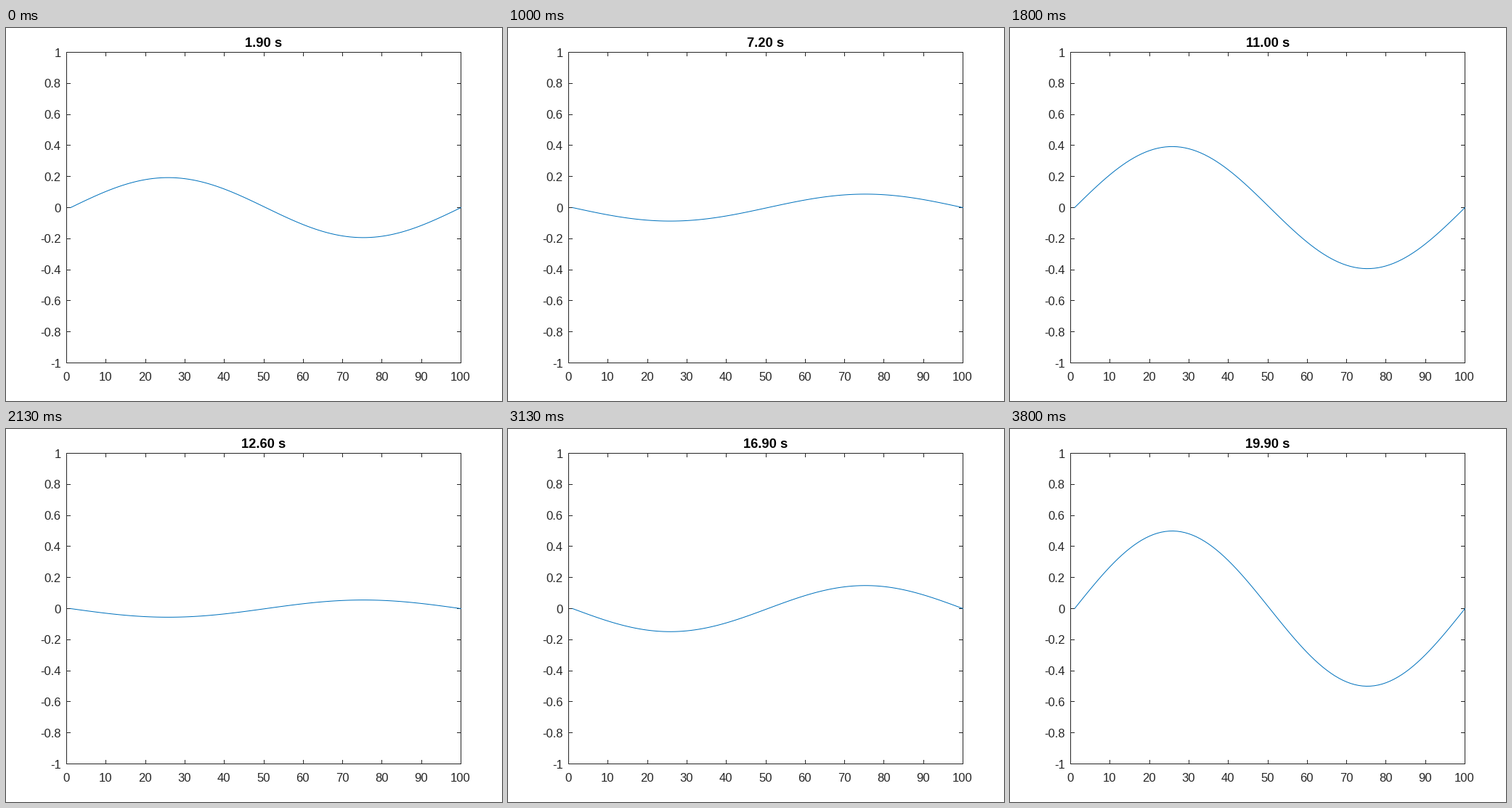
A matplotlib script for the animation above (3.87 s loop, 683 by 514 pixels).

```python
import numpy as np
import matplotlib.pyplot as plt
from matplotlib.animation import FuncAnimation
from matplotlib.collections import LineCollection

W, H, DPI = 683, 514, 64
LEFT, RIGHT, TOP, BOTTOM = 83.5, 626.5, 33.5, 461.5
TICK = 5
PT = 72 / DPI          # points per pixel
INK = "#262626"
STEP_MS, TICKS, SHOTS = 10, 387, 58

plt.rcParams["font.family"] = "Liberation Sans"
plt.rcParams["path.simplify"] = False
fig = plt.figure(figsize=(W / DPI, H / DPI), dpi=DPI, facecolor="white")
ax = fig.add_axes([0, 0, 1, 1])
ax.set(xlim=(0, W), ylim=(H, 0))
ax.axis("off")


def px(x):
    return LEFT + (RIGHT - LEFT) * x / 100


def py(y):
    return BOTTOM - (BOTTOM - TOP) * (y + 1) / 2


def label(x, y, text, ha, size=50 / 3, **kw):
    return ax.text(x, y, text, ha=ha, va="baseline", fontsize=size * PT, **kw)


# Frame, inward ticks and their labels; lines run through pixel centres
segs = [[(LEFT, TOP), (RIGHT, TOP), (RIGHT, BOTTOM), (LEFT, BOTTOM), (LEFT, TOP)]]
for v in range(0, 101, 10):
    x = np.floor(px(v)) + 0.5
    segs += [[(x, BOTTOM), (x, BOTTOM - TICK)], [(x, TOP), (x, TOP + TICK)]]
    label(px(v) - 0.5, 486, str(v), "center", color=INK)
for i in range(-5, 6):
    y = np.floor(py(i / 5)) + 0.5
    segs += [[(LEFT, y), (LEFT + TICK, y)], [(RIGHT, y), (RIGHT - TICK, y)]]
    label(75.5, py(i / 5) + 6.2, f"{i / 5:g}", "right", color=INK)
frame = LineCollection(segs, colors=INK, linewidths=PT, capstyle="projecting")
frame.set_snap(False)
ax.add_collection(frame)

# Standing wave on a string of 100 points
points = np.arange(1, 101)
mode = np.sin(2 * np.pi * (points - 1) / 99)
wave, = ax.plot(px(points), py(0 * mode), color="#0072BD", lw=PT, zorder=3, snap=False)
title = label(355, 26, "", "center", 55 / 3, weight="bold", color="black")

# Simulated seconds at a few picture numbers; the clock ran unevenly
MARKS = [0, 8, 9, 10, 21, 23, 24, 32, 39, 40, 47, 56, 57]
CLOCK = [1.9, 4.5, 4.8, 5.2, 9.5, 9.8, 10.1, 12.6, 14.9, 15.2, 16.9, 19.6, 19.9]


def update(n):
    shot = min((3 * n + 2) // 20, SHOTS - 1)
    t = round(float(np.interp(shot, MARKS, CLOCK)), 1)
    wave.set_ydata(py(0.5 * np.cos(2 * np.pi * (t - 0.05) / 9.9) * mode))
    title.set_text(f"{t:.2f} s")
    return wave, title


anim = FuncAnimation(fig, update, frames=TICKS, init_func=lambda: update(0),
                     interval=STEP_MS, repeat=True, repeat_delay=0, blit=False)
plt.show()
```
